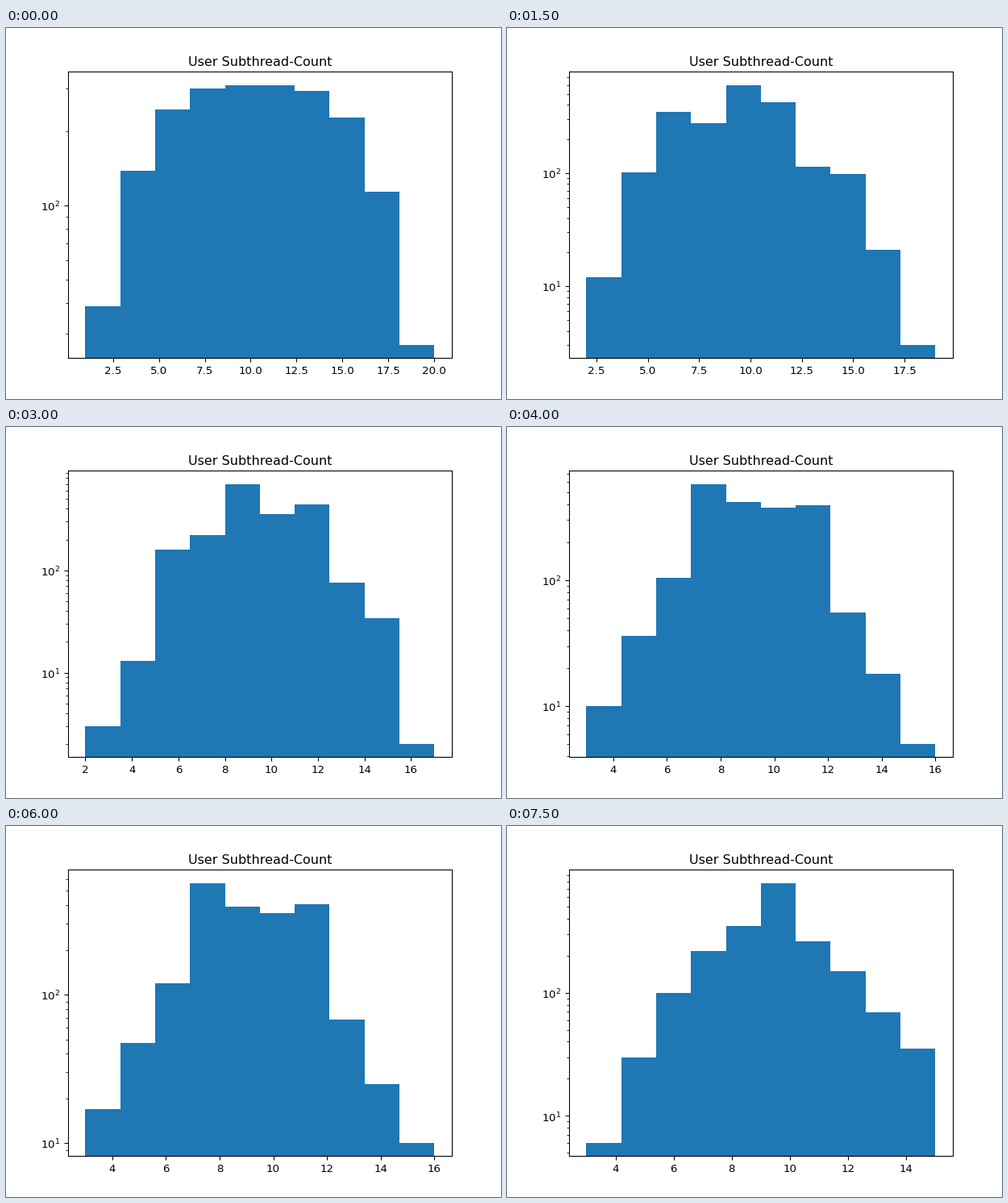
A matplotlib script for the animation above (8 s loop, 614 by 460 pixels).

```python
import numpy as np
import matplotlib.pyplot as plt
from matplotlib.animation import FuncAnimation
from matplotlib.transforms import ScaledTranslation

W, H, DPI = 614, 460, 96
STEPS = 16
USERS = 2000
BINS = 10

# step, lowest, highest, mean, spread, falloff power, skew
KEYS = np.array([
    (0, 1, 20, 10.3, 5.98, 3.75, 1.0),
    (3, 2, 19, 9.2, 2.6, 2.0, 0.8),
    (5, 1, 17, 9.3, 2.3, 2.2, 1.0),
    (8, 3, 16, 9.1, 1.9, 2.0, 0.9),
    (12, 3, 16, 9.1, 2.05, 2.0, 0.9),
    (15, 3, 15, 9.1, 1.95, 2.0, 0.7),
]).T


def bell(x, mean, spread, power, skew):
    z = ((x / mean) ** skew - 1) * mean / (skew * spread)
    return np.exp(-0.5 * np.abs(z) ** power)


def histogram(step):
    low, high, *shape = (np.interp(step, KEYS[0], row) for row in KEYS[1:])
    low, high = round(low), int(np.ceil(high))
    values = np.arange(low, high + 1)
    share = bell(values, *shape)
    counts, edges = np.histogram(values, np.linspace(low, high, BINS + 1),
                                 weights=USERS * share / share.sum())
    return np.maximum(np.round(counts), 1), edges


fig = plt.figure(figsize=(W / DPI, H / DPI), dpi=DPI)
ax = fig.add_axes([76.8 / W, 50.688 / H, 476.16 / W, 354.816 / H])
nudge = ScaledTranslation(0, -0.8 / DPI, fig.dpi_scale_trans)


def draw(step):
    counts, edges = histogram(step)
    ax.clear()
    ax.hist(edges[:-1], edges, weights=counts, log=True)
    ax.set_title("User Subthread-Count")
    for text in [ax.title, *ax.get_xticklabels(), *ax.get_yticklabels()]:
        text.set_transform(text.get_transform() + nudge)
    return []


anim = FuncAnimation(fig, draw, frames=STEPS, interval=500,
                     repeat=True, repeat_delay=0, blit=False)
plt.show()
```
